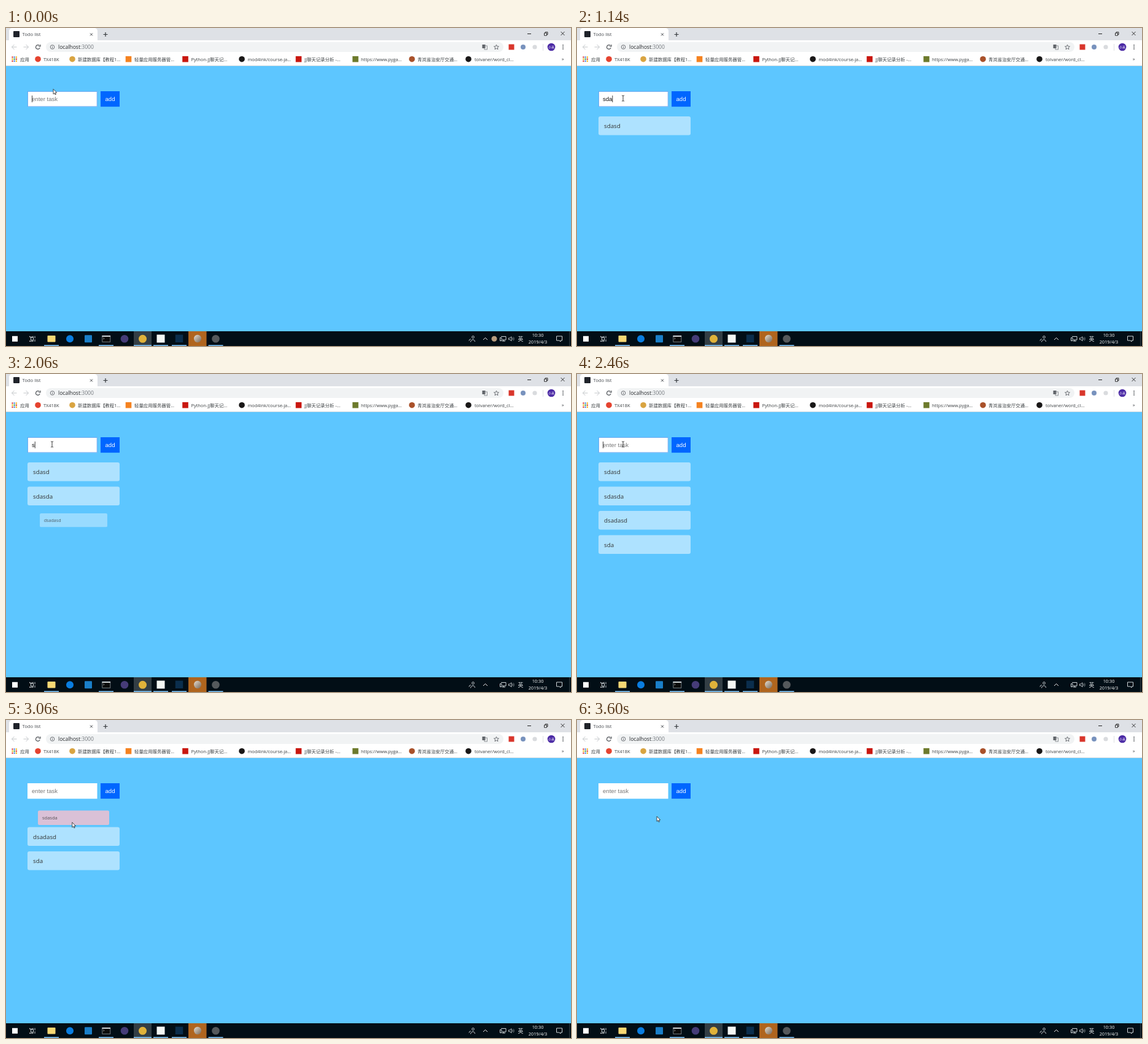
Recreate the animation shown at these times as an HTML page with a canvas. Size 920 by 518 pixels, loop 3620 ms.

```html
<!DOCTYPE html>
<html lang="en">
<head>
<meta charset="utf-8">
<title>Todo list</title>
<style>
html, body { margin: 0; width: 920px; height: 518px; overflow: hidden; }
canvas { display: block; }
</style>
</head>
<body>
<canvas id="stage" width="920" height="518"></canvas>
<script>
const ctx = document.getElementById('stage').getContext('2d');
const LOOP = 3620;
const UI = '"Open Sans", "Noto Sans CJK SC", "Noto Sans CJK", sans-serif';
const ARIAL = '"Liberation Sans", Arial, sans-serif';

const clamp = v => Math.max(0, Math.min(1, v));
const easeOut = v => 1 - Math.pow(1 - clamp(v), 1.7);
const smooth = v => v * v * (3 - 2 * v);

function rect(x, y, w, h, color, radius = 0) {
  ctx.fillStyle = color;
  ctx.beginPath();
  ctx.roundRect(x, y, w, h, radius);
  ctx.fill();
}
function square(x, y, size, color, radius = 0) {
  rect(x - size / 2, y - size / 2, size, size, color, radius);
}
function disc(x, y, r, color) {
  ctx.fillStyle = color;
  ctx.beginPath();
  ctx.arc(x, y, r, 0, Math.PI * 2);
  ctx.fill();
}
function ring(x, y, r, color, width = 1, from = 0, to = Math.PI * 2) {
  ctx.strokeStyle = color;
  ctx.lineWidth = width;
  ctx.beginPath();
  ctx.arc(x, y, r, from, to);
  ctx.stroke();
}
function frame(x, y, w, h, color, width = 1) {
  ctx.strokeStyle = color;
  ctx.lineWidth = width;
  ctx.strokeRect(x, y, w, h);
}
function stroke(path, x, y, color, width = 1) {
  ctx.save();
  ctx.translate(x, y);
  ctx.strokeStyle = color;
  ctx.lineWidth = width;
  ctx.stroke(new Path2D(path));
  ctx.restore();
}
function text(string, x, baseline, size, color, align = 'left', font = UI) {
  ctx.font = `${size}px ${font}`;
  ctx.textAlign = align;
  ctx.fillStyle = color;
  ctx.fillText(string, x, baseline);
}

function drawTabStrip() {
  rect(0, 0, 920, 21, '#dee1e6');
  rect(5, 0, 144, 22, '#fff', [5, 5, 0, 0]);
  square(17, 10, 10, '#20232a', 1);
  text('Todo list', 26.5, 13.2, 7.7, '#45494e');
  stroke('M-2-2L2 2M2-2L-2 2', 139, 10.5, '#45494e', 1);
  stroke('M-3.5 0H3.5M0-3.5V3.5', 162, 10.5, '#33373b', 1.2);
  stroke('M-3 0H3', 852, 9.5, '#222');
  stroke('M-2.5-1H1.5V3H-2.5ZM-1-1V-2.5H3V1.5H1.5', 879, 9.2, '#222', 0.9);
  stroke('M-3-3L3 3M3-3L-3 3', 906.5, 9, '#222', 0.9);
}

function drawToolbar() {
  rect(0, 20, 920, 41, '#fff');
  rect(0, 61, 920, 1, '#cfdbe2');
  const arrow = 'M4 0H-4M0-4L-4 0L0 4';
  stroke(arrow, 13.5, 31, '#c3c6c9');
  stroke('M-4 0H4M0-4L4 0L0 4', 32.5, 31, '#c3c6c9');
  ring(52, 31, 3.4, '#53575c', 1.2, 0.4, 5.5);
  stroke('M4-4V-1H1', 52, 31, '#53575c', 1.2);

  rect(65, 23, 745, 16, '#f1f3f4', 8);
  ring(75.5, 31, 3.3, '#5f6368', 0.9);
  stroke('M0-1.8V-.8M0-.2V1.9', 75.5, 31, '#5f6368', 0.9);
  text('localhost', 85, 34.1, 8.6, '#25282b');
  const hostWidth = ctx.measureText('localhost').width;
  text(':3000', 85 + hostWidth, 34.1, 8.6, '#74797e');

  rect(775.5, 27, 5, 6, '#5f6368');
  frame(779, 29, 4.5, 6, '#777c81', 0.8);
  stroke('M0-4L1.1-1.3L4-1.2L1.8.7L2.5 3.6L0 2L-2.5 3.6L-1.8.7L-4-1.2L-1.1-1.3Z', 798.5, 31.2, '#5f6368', 0.9);
  square(823, 31, 9, '#d9362c');
  disc(842, 31, 4, '#7892bd');
  disc(861, 31, 3.6, '#d9dbde');
  rect(874, 26, 0.8, 11, '#d5d8db');
  disc(888, 31, 6.3, '#4b2aa5');
  text('小禾', 888, 32.9, 5, '#fff', 'center');
  for (const dy of [-3, 0, 3]) disc(907, 31 + dy, 0.9, '#505459');
}

const bookmarks = [
  [52, '#e5432f', 'disc', 61, 'TX418K'],
  [108, '#d9a441', 'disc', 117, '新建数据库【教程1...'],
  [199.5, '#f58220', 'square', 209, '轻量应用服务器管...'],
  [292, '#c9170f', 'square', 301.5, 'Python-JJ聊天记...'],
  [384, '#191717', 'disc', 393.5, 'mod4ink/course-ja...'],
  [476.5, '#c9170f', 'square', 486, 'JJ聊天记录分析 -...'],
  [569, '#6d7a2c', 'square', 578, 'https://www.pyga...'],
  [661, '#a9512a', 'disc', 670, '青岚省治安厅交通...'],
  [753, '#191717', 'disc', 763, 'tolvaner/word_cl...']
];
function drawBookmarks() {
  const dots = ['#e34133', '#34a853', '#f2b51d', '#4285f4'];
  for (let i = 0; i < 9; i++)
    square(10.5 + (i % 3) * 3.2, 47.5 + Math.floor(i / 3) * 3.2, 2.2, dots[(i * 3 + (i / 3 | 0)) % 4]);
  text('应用', 23, 53.6, 7.4, '#3c4043');
  for (const [iconX, color, shape, x, label] of bookmarks) {
    if (shape === 'disc') disc(iconX, 50.7, 4.8, color);
    else square(iconX, 50.7, 9.6, color);
    text(label, x, 53.6, 7.4, '#3c4043');
  }
  text('»', 906.5, 52.8, 7.5, '#3c4043', 'center');
}

function drawTaskbar(trayIcon) {
  rect(0, 494, 920, 24, '#020e16');
  rect(208, 494, 29, 24, '#333e45');
  rect(297, 494, 29.5, 24, '#b0651e');
  for (const x of [74, 163, 252, 282, 341.5]) rect(x - 12, 516.3, 24, 1.7, '#76b9ed');
  rect(208, 516.3, 29, 1.7, '#76b9ed');

  square(14.5, 506.3, 9, '#fff');
  frame(40.5, 504, 4, 4.5, '#dfe3e5', 0.9);
  stroke('M-4.5-4.5V-3M-4.5 4.5V3M1-4.5V-3M1 4.5V3M4-4.5V-1M4 1V4.5M-4.5-3H1M-4.5 4H1', 43, 506.3, '#dfe3e5', 0.9);
  rect(67.5, 501, 13, 10.5, '#f7d774', 1);
  disc(104, 506.3, 6, '#0a7de0');
  square(134, 506.3, 12, '#1a7fc9', 1);
  rect(156.5, 501, 13.5, 10.5, '#0b0b0b');
  frame(156.8, 501.3, 13, 10, '#8d9499', 0.8);
  rect(156.5, 501, 13.5, 2, '#c9ced1');
  stroke('M0 0L1.5 1.2L0 2.4', 158.5, 504.5, '#d6d6d6', 0.7);
  disc(193, 506.3, 6.3, '#463c78');
  disc(222.5, 506.3, 6.5, '#e0b23a');
  square(252, 506, 13, '#f4f7f4');
  square(282, 505.8, 12.5, '#0b2e4d');
  const photo = ctx.createLinearGradient(306, 500, 318, 512);
  photo.addColorStop(0, '#e6ddd0');
  photo.addColorStop(1, '#77695a');
  ctx.fillStyle = photo;
  ctx.beginPath();
  ctx.ellipse(312, 506, 6, 6.2, 0, 0, 7);
  ctx.fill();
  disc(341.5, 506.2, 6.3, '#55595c');

  const pale = '#e4e8ea';
  ring(760.5, 503.5, 1.8, pale, 0.9);
  stroke('M-2.5 5.5C-2 1 4 0 4.5 5M-5 3.5C-4.5 1-3 .5-2 1', 759, 506, pale, 0.9);
  stroke('M-3.5 2L0-1.5L3.5 2', 780.5, 506, pale, 1);
  if (trayIcon) {
    disc(795, 506.3, 4.5, '#b79b7e');
  }
  stroke('M-3-3.5H5V2H-1M1 2V4M-1 4H4M-4.5-1.5H-2V3.5H-4.5Z', 809, 506, pale, 0.9);
  stroke('M-4.5-1.3H-2.5L0-3.5V3.5L-2.5 1.3H-4.5Z', 823, 506.3, pale, 0.8);
  ring(823, 506.3, 2.3, pale, 0.7, -0.8, 0.8);
  ring(823, 506.3, 4.3, '#9ba4a8', 0.7, -0.8, 0.8);
  text('英', 838, 509.6, 8.8, pale, 'center');
  text('10:30', 866, 503.4, 7.3, '#fff', 'center');
  text('2019/4/3', 866, 514.2, 7.3, '#fff', 'center');
  stroke('M-4.5-4H4.5V3H2V5L0 3H-4.5Z', 901, 506, pale, 0.9);
  rect(917, 494, 0.7, 24, '#48545b');
}

const KEYS = 'sdasd\nsdasda\ndsadasd\nsda\n';
const TYPE_START = 580, KEY_STEP = 70, ANIM = 150, BLINK = 320;
const HOVER_START = 2740;
const clicks = [2810, 3040, 3290, 3440];
const tasks = KEYS.trim().split('\n');
const births = [...KEYS].flatMap((key, i) => key === '\n' ? [TYPE_START + i * KEY_STEP] : []);
const hoverTimes = clicks.map((_, i) => i ? clicks[i - 1] + 90 : HOVER_START);

const route = [
  [0, 77, 99.5], [120, 77, 99.5], [300, 75, 114.5], [2540, 75, 114.5],
  [2750, 103, 168], [2860, 104.5, 170], [3280, 111.5, 163],
  [3440, 114, 163], [3600, 130, 157], [LOOP, 130, 157]
];
function pointerAt(t) {
  const next = route.findIndex(stop => stop[0] > t);
  const [startTime, startX, startY] = route[next - 1];
  const [endTime, endX, endY] = route[next];
  const k = smooth((t - startTime) / (endTime - startTime));
  return [startX + (endX - startX) * k, startY + (endY - startY) * k];
}

function drawForm(t) {
  const focused = t < HOVER_START + 50;
  const count = Math.max(0, Math.min(KEYS.length, Math.floor((t - TYPE_START) / KEY_STEP) + 1));
  const value = KEYS.slice(0, count).split('\n').pop();
  rect(35, 103, 113.5, 25.2, '#fff');
  if (focused) frame(35.4, 103.4, 112.8, 24.5, '#5a9fef', 0.9);
  text(value || 'enter task', 42, 118.7, 9.58, value ? '#111' : '#777', 'left', ARIAL);
  const lastKey = count ? TYPE_START + (count - 1) * KEY_STEP : 0;
  if (focused && Math.floor((t - lastKey) / BLINK) % 2 === 0) {
    const width = value ? ctx.measureText(value).width : 0;
    rect(42 + width, 110, 0.8, 11, '#111');
  }
  rect(154, 103, 31, 25.2, '#06f');
  text('add', 169.5, 118.7, 9.58, '#fff', 'center', ARIAL);
}

function drawTasks(t) {
  let slot = 0;
  tasks.forEach((label, i) => {
    const grown = easeOut((t - births[i]) / ANIM);
    const gone = easeOut((t - clicks[i]) / ANIM);
    const scale = grown * (1 - gone);
    const y = 144 + slot * 39.5;
    slot += 1 - gone;
    if (scale <= 0) return;
    const pink = clamp((t - hoverTimes[i]) / 80);
    ctx.save();
    ctx.globalAlpha = scale;
    ctx.translate(110, y + 15.2);
    ctx.scale(scale, scale);
    rect(-75, -15.2, 150, 30.4, `rgba(255,${255 - 63 * pink},${255 - 52 * pink},${0.5 + pink / 2})`, 3);
    text(label, -66, 3.9, 9.75, '#333');
    ctx.restore();
  });
}

const arrowShape = new Path2D('M0 0V8.2L1.9 6.5L3.1 9.2L4.4 8.7L3.2 6L5.7 5.8Z');
const handShape = new Path2D('M-.8 .6C-.8-.2 .8-.2 .8 .6V4L4 4.7C5 5 5 6 4.8 7L4 10.6H-.8L-3 7C-3.2 6-2.2 5.7-.8 7.2Z');
function drawPointer(t) {
  const [x, y] = pointerAt(t);
  const hovering = hoverTimes.some((start, i) => t >= start && t < clicks[i] + 20);
  if (y > 103 && y < 128) {
    stroke('M-2-4.5H-.5L0-4L.5-4.5H2M0-4V4M-2 4.5H-.5L0 4L.5 4.5H2', x, y, '#222', 0.9);
    return;
  }
  const shape = hovering ? handShape : arrowShape;
  ctx.save();
  ctx.translate(x, y);
  ctx.fillStyle = '#fff';
  ctx.strokeStyle = '#222';
  ctx.lineWidth = 0.8;
  ctx.fill(shape);
  ctx.stroke(shape);
  ctx.restore();
}

function draw() {
  const t = performance.now() % LOOP;
  rect(0, 0, 920, 518, '#5dc6ff');
  drawTabStrip();
  drawToolbar();
  drawBookmarks();
  drawForm(t);
  drawTasks(t);
  drawTaskbar(t < 340 || (t > 1500 && t < 1840));
  drawPointer(t);
  requestAnimationFrame(draw);
}
draw();
</script>
</body>
</html>
```
